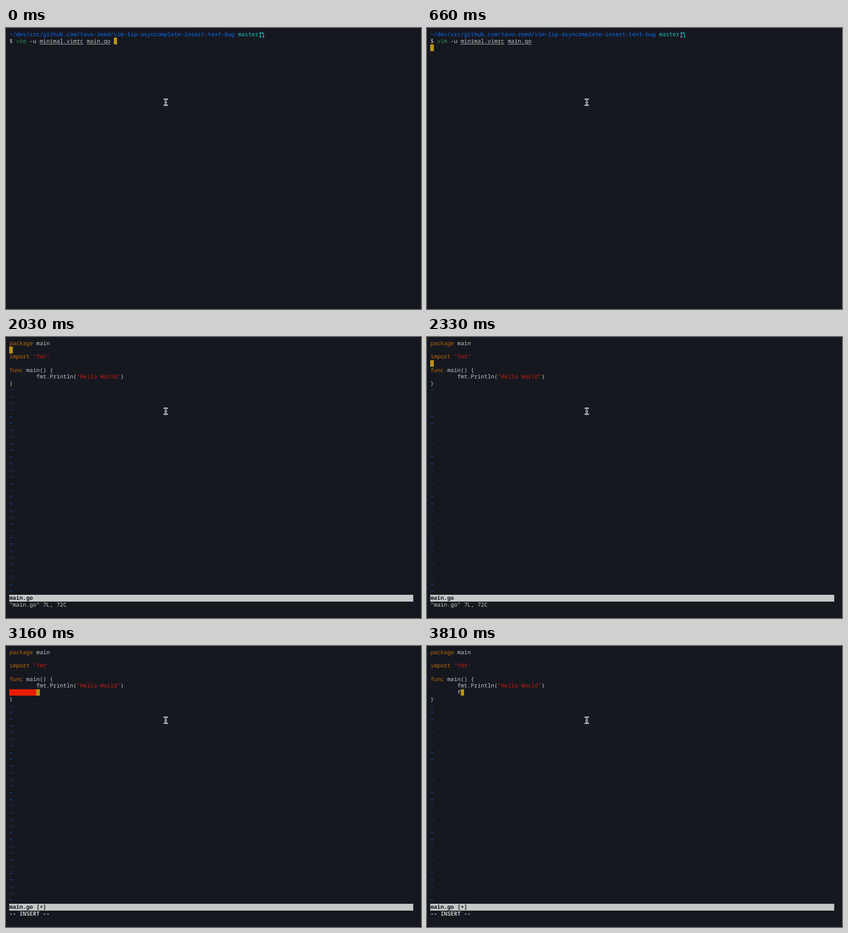
Animation of 908 by 617 pixels, one loop 8 s. Source, as an HTML page:

```html
<!DOCTYPE html>
<html lang="en">
<head>
<meta charset="utf-8">
<title>Terminal session</title>
<style>
  :root {
    --cw: 7.367px; --ch: 14.72px; --x0: 7.4px; --y0: 6.45px;
    --bg: #161820; --fg: #c5c8c6; --gold: #b99314;
  }
  html, body { margin: 0; width: 100%; height: 100%; overflow: hidden; background: var(--bg); }
  #stage { position: relative; width: 908px; height: 617px; overflow: hidden; color: var(--fg); }

  /* everything sits on the character grid */
  .box, pre {
    --row: 0; --col: 0;
    position: absolute; margin: 0;
    left: calc(var(--x0) + var(--col) * var(--cw));
    top: calc(var(--y0) + var(--row) * var(--ch));
  }
  .box { width: calc(var(--w, 1) * var(--cw)); height: var(--ch); }
  pre {
    margin-top: .4px;
    font: 12.278px/14.72px "Noto Sans Mono", "DejaVu Sans Mono", monospace;
    text-rendering: geometricPrecision;
    white-space: pre;
  }
  svg { position: absolute; left: 0; top: 0; fill: none; }

  .path { color: #0b6cf5; }
  .branch { color: #14c9c0; }
  .cmd { color: #2f8f4a; }
  .key { color: #b96a05; }
  .str { color: #c71b10; }
  .tilde { color: #0d5cd0; }
  .bar { --w: 120; background: var(--fg); }
  .title { color: var(--bg); font-weight: bold; }
  .trail { --w: 8; background: #e81e00; }
  .cursor { background: var(--gold); }
  u { text-decoration-thickness: 1px; text-underline-offset: 2px; }

  .shell, .editor, .before, .after, .trail, .typed, .cursor, .lit {
    animation: 8s step-end infinite;
  }
  .shell { animation-name: shell; }
  .editor { animation-name: editor; }
  .before { animation-name: before; }
  .after { animation-name: after; }
  .trail { animation-name: trail; }
  .typed { animation-name: typed; }
  .cursor { animation-name: cursor; }
  .lit.first { animation-name: lit-first; }
  .lit.third { animation-name: lit-third; }
  .lit.fifth { animation-name: lit-fifth; }

  @keyframes shell { 0% { visibility: visible } 10.75%, 100% { visibility: hidden } }
  @keyframes editor { 0% { visibility: hidden } 10.75%, 100% { visibility: visible } }
  @keyframes before { 0% { visibility: hidden } 10.75% { visibility: visible } 39.5%, 100% { visibility: hidden } }
  @keyframes after { 0% { visibility: hidden } 39.5%, 100% { visibility: visible } }
  @keyframes trail { 0% { visibility: hidden } 39.5% { visibility: visible } 47.625%, 100% { visibility: hidden } }
  @keyframes typed { 0% { visibility: hidden } 47.625%, 100% { visibility: visible } }
  @keyframes cursor {
    0% { --row: 1; --col: 31 }
    8.25% { --row: 2; --col: 0 }
    10.75% { --row: 0; --col: 0 }
    25.375% { --row: 1; --col: 0 }
    27.625% { --row: 2; --col: 0 }
    29.0625% { --row: 3; --col: 0 }
    30.5% { --row: 4; --col: 0 }
    33.5% { --row: 5; --col: 7 }
    39.5% { --row: 6; --col: 8 }
    47.625%, 100% { --row: 6; --col: 9 }
  }
  /* letters under the block cursor turn dark */
  @keyframes lit-first { 10.75% { color: var(--bg) } 25.375% { color: #b96a05 } }
  @keyframes lit-third { 27.625% { color: var(--bg) } 29.0625% { color: #b96a05 } }
  @keyframes lit-fifth { 30.5% { color: var(--bg) } 33.5% { color: #b96a05 } }
</style>
</head>
<body>
<div id="stage">
  <div class="box cursor"></div>

  <div class="shell">
    <pre><span class="path">~/dev/src/github.com/tavo-reed/vim-lsp-asyncomplete-insert-text-bug</span> <span class="branch">master</span>
$ <span class="cmd">vim</span> -u <u>minimal.vimrc</u> <u>main.go</u></pre>
    <svg width="908" height="617" stroke="#14c9c0" stroke-width="1.2">
      <circle cx="556.4" cy="10.8" r="1.3"/>
      <circle cx="556.4" cy="19.4" r="1.3"/>
      <circle cx="563.4" cy="19.4" r="1.3"/>
      <path d="M556.4 12.2V18M563.4 18V13.2Q563.4 11 561 11H559.8M561.8 8.8L559.6 11L561.8 13.2"/>
    </svg>
  </div>

  <div class="editor">
    <pre><span class="key"><span class="lit first">p</span>ackage</span> main

<span class="key"><span class="lit third">i</span>mport</span> <span class="str">"fmt"</span>

<span class="key"><span class="lit fifth">f</span>unc</span> main() {
        fmt.Println(<span class="str">"Hello World"</span>)</pre>
    <pre class="tilde" id="filler" style="--row:8"></pre>
    <div class="box bar" style="--row:38"></div>
  </div>

  <div class="before">
    <pre style="--row:6">}
<span class="tilde">~</span></pre>
    <pre class="title" style="--row:38">main.go</pre>
    <pre style="--row:39">"main.go" 7L, 72C</pre>
  </div>

  <div class="after">
    <pre style="--row:7">}</pre>
    <pre class="title" style="--row:38">main.go [+]</pre>
    <pre style="--row:39;font-weight:bold">-- INSERT --</pre>
  </div>
  <div class="box trail" style="--row:6"></div>
  <pre class="typed" style="--row:6;--col:8">f</pre>

  <svg width="908" height="617" stroke-linecap="square">
    <defs>
      <path id="beam" d="M346.5 156.5H348.5L349.5 157.5L350.5 156.5H352.5M349.5 157.5V168.5M348.5 163.5H350.5M346.5 169.5H348.5L349.5 168.5L350.5 169.5H352.5"/>
    </defs>
    <use href="#beam" stroke="#fff" stroke-width="2.8"/>
    <use href="#beam" stroke="#111319" stroke-width="1"/>
  </svg>
</div>
<script>
  document.getElementById('filler').textContent = '~\n'.repeat(30);
</script>
</body>
</html>
```
